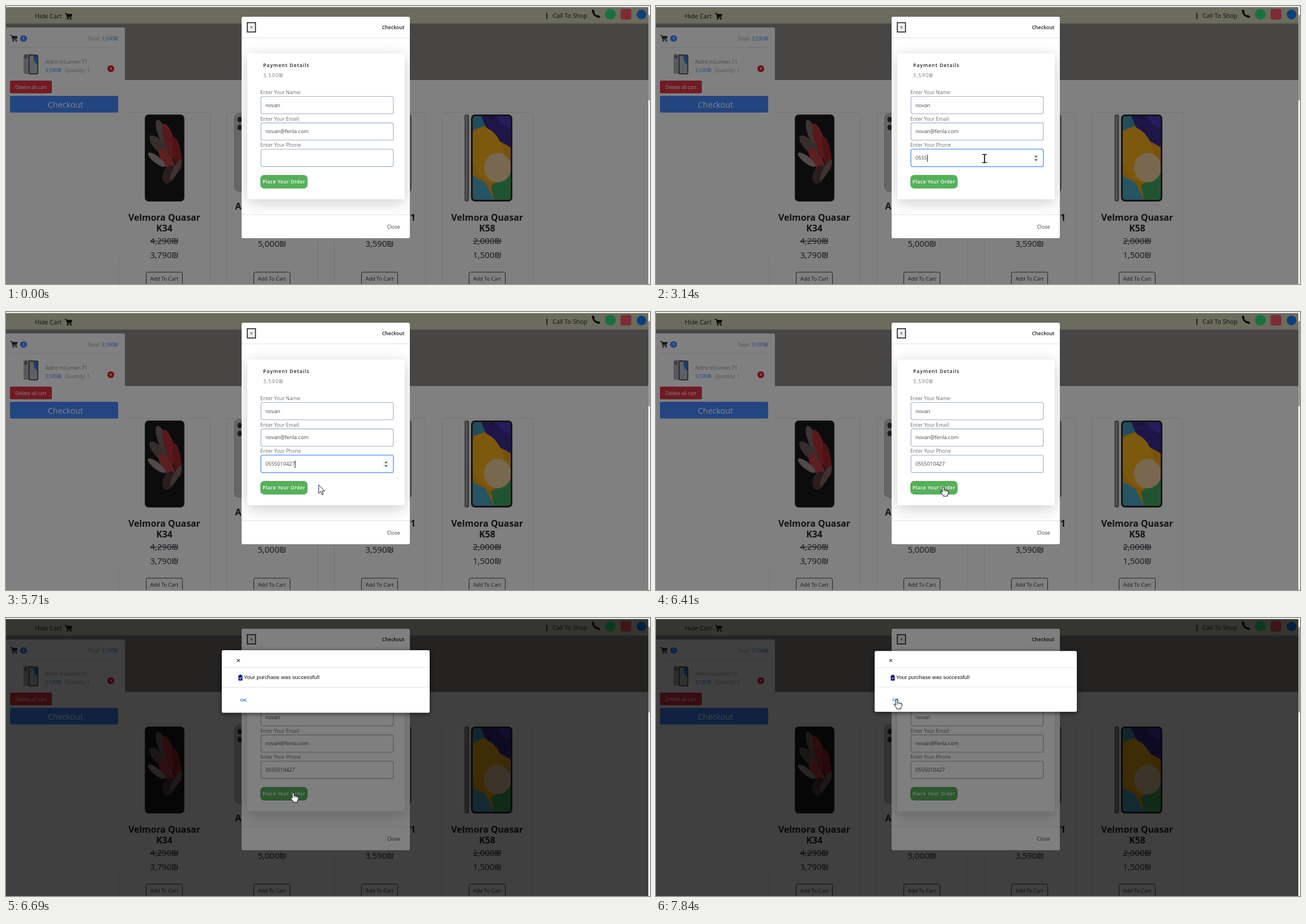
Recreate the animation shown at these times as an HTML page with a canvas. Size 1137 px wide and 492 px high, loop 8000 ms.

```html
<!DOCTYPE html>
<html lang="en">
<head>
<meta charset="utf-8">
<title>Shop checkout</title>
<style>
html, body { margin: 0; width: 100%; height: 100%; overflow: hidden; background: #808080; }
canvas { display: block; width: 1137px; height: 492px; }
</style>
</head>
<body>
<canvas id="stage" width="1137" height="492"></canvas>
<script>
const c = document.getElementById('stage').getContext('2d');
const LOOP = 8000;
const UI = '"Open Sans", "Noto Sans", "DejaVu Sans", sans-serif';
const ARIAL = '"Liberation Sans", Arial, sans-serif';

const NAME = 'novan', EMAIL = 'novan@fenla.com', PHONE = '0555010427';
const KEY_TIMES = [2570, 2710, 2860, 3140, 3290, 3430, 3710, 4140, 4290, 4420];
const CARET_FLIPS = [1430, 1860, 2430, 4860, 5430, 5860];
const FOCUS = 1430, BLUR = 6290;

// time, x, y, pointer kind
const MOVES = [
  [570, 1085, 472, 'arrow'], [710, 985, 425, 'arrow'], [860, 850, 365, 'arrow'], [1000, 725, 315, 'arrow'],
  [1140, 640, 280, 'beam'], [1290, 594, 272, 'beam'], [1430, 580, 270, 'beam'],
  [5140, 588, 272, 'beam'], [5290, 600, 279, 'beam'], [5430, 594, 290, 'arrow'], [5570, 578, 300, 'arrow'],
  [5710, 552, 306, 'arrow'], [5860, 527, 309, 'hand'], [6000, 514, 309, 'hand'], [6120, 507, 309, 'hand'],
  [6970, 504, 296, 'arrow'], [7110, 498, 274, 'arrow'], [7250, 490, 246, 'arrow'],
  [7390, 468, 212, 'arrow'], [7540, 446, 179, 'arrow'], [7680, 431, 155, 'arrow'], [7840, 425, 144, 'hand']
];
// time, scale, opacity, dimmer
const POPUP = [[6560, 0.987, 0.24, 0.25], [6690, 1.028, 1, 0.5], [6830, 0.98, 1, 0.5], [6970, 1, 1, 0.5]];

const passed = (times, t) => times.filter(v => t >= v).length;
const held = (rows, t) => rows.filter(r => t >= r[0]).pop();

function rect(x, y, w, h, fill, r = 0, line, lw = 1) {
  c.beginPath();
  c.roundRect(x, y, w, h, r);
  if (fill) { c.fillStyle = fill; c.fill(); }
  if (line) { c.strokeStyle = line; c.lineWidth = lw; c.stroke(); }
}
function oval(x, y, rx, ry, fill, turn = 0) {
  c.beginPath();
  c.ellipse(x, y, rx, ry, turn, 0, 7);
  c.fillStyle = fill;
  c.fill();
}
function shape(points, fill, line, lw = 1, close = true) {
  c.beginPath();
  for (let i = 0; i < points.length; i += 2) c.lineTo(points[i], points[i + 1]);
  if (close) c.closePath();
  if (fill) { c.fillStyle = fill; c.fill(); }
  if (line) { c.strokeStyle = line; c.lineWidth = lw; c.stroke(); }
}
// y is the middle of the capitals
function text(str, x, y, size, fill, { weight = 400, align = 'left', gap = 0, font = UI } = {}) {
  c.font = `${weight} ${size}px ${font}`;
  c.textAlign = align;
  c.letterSpacing = gap + 'px';
  c.fillStyle = fill;
  c.fillText(str, x, y + size * 0.36);
  return c.measureText(str).width;
}
function at(x, y, draw, scale = 1) {
  c.save();
  c.translate(x, y);
  c.scale(scale, scale);
  draw();
  c.restore();
}

function cartIcon(x, y, color) {
  at(x, y, () => {
    shape([0, 1, 2.5, 1, 4.5, 8.5, 11.5, 8.5], null, color, 1.4, false);
    shape([2.8, 2, 13, 2, 11.6, 7, 4.2, 7], color);
    oval(5, 10.8, 1.4, 1.4, color);
    oval(10.5, 10.8, 1.4, 1.4, color);
  });
}
function handset(x, y) {
  at(x, y, () => {
    c.beginPath();
    c.moveTo(-4.8, -4.5);
    c.quadraticCurveTo(-3.5, 3, 4.5, 5);
    c.strokeStyle = '#060606';
    c.lineWidth = 3;
    c.stroke();
    oval(-4.3, -4.6, 2, 3.2, '#060606', -0.4);
    oval(4.7, 4.6, 3.2, 2, '#060606', 0.4);
  });
}

function header() {
  rect(0, 0, 1137, 492, '#808080');
  rect(0, 31, 1134, 100, '#484645');
  rect(0, 2, 1134, 29, '#6b6c5e');
  rect(0, 30, 1134, 1.5, '#5f6054');
  text('Hide Cart', 51, 18.5, 10.8, '#111');
  cartIcon(104, 12, '#080808');
  rect(954, 12, 1.7, 11, '#111');
  text('Call To Shop', 965, 17, 10.8, '#111');
  handset(1041, 14);
  oval(1067, 14.5, 9.5, 9.5, '#1a7040');
  rect(1085, 5, 19, 19, '#7c2c34', 4);
  oval(1122, 15, 8.5, 8.5, '#0c3f7c');
}

function darkPhone() {
  rect(245, 192, 70, 154, '#151415', 7);
  c.save();
  rect(247, 194, 66, 150, '#0c0c0d', 5);
  c.clip();
  oval(276, 226, 8, 26, '#3d3535', -0.35);
  oval(289, 240, 9, 33, '#59191b', -0.3);
  oval(302, 262, 7, 30, '#4c1416', -0.15);
  oval(270, 247, 9, 23, '#352e2d', -0.75);
  oval(284, 272, 9, 25, '#5c2021', -0.55);
  oval(266, 272, 6, 19, '#514a48', -0.9);
  oval(288, 298, 11, 17, '#2a1d1d', 0.4);
  oval(300, 290, 5, 20, '#3a3432', 0.5);
  c.restore();
  oval(280, 198, 1.4, 1.4, '#050505');
}
function colourPhone() {
  rect(809.5, 192, 8, 154, '#3d3d3e', 3);
  rect(812, 194, 2, 150, '#5e5e5f', 1);
  rect(821, 192, 73, 154, '#141415', 7);
  c.save();
  rect(824, 195, 67, 148, '#78520a', 5);
  c.clip();
  shape([838, 195, 891, 195, 891, 250, 866, 236, 846, 212], '#1e1548');
  shape([866, 195, 891, 195, 891, 216, 874, 208], '#281b5c');
  shape([824, 195, 839, 195, 846, 212, 824, 220], '#204e5e');
  oval(850, 263, 29, 49, '#7d590e', -0.25);
  shape([824, 301, 846, 312, 862, 343, 824, 343], '#265462');
  shape([856, 318, 891, 296, 891, 343, 862, 343], '#205430');
  oval(868, 286, 24, 26, '#786850');
  c.restore();
  oval(858, 198, 1.5, 1.5, '#08080a');
}

function productCard(x, lines, price, old) {
  const mid = x + 80.5, mdl = { align: 'center' };
  rect(x + 0.5, 188.5, 161, 320, null, 3, '#747474');
  lines.forEach((s, i) => text(s, mid, 374.5 + i * 19, 15.8, '#111213', { weight: 700, align: 'center' }));
  if (old) {
    const w = text(old, mid, 416, 15, '#15161c', mdl);
    rect(mid - w / 2, 415.5, w, 1.1, '#15161c');
  }
  text(price, mid, old ? 441 : 421, 15, '#15161c', mdl);
  rect(x + 48.5, 471, 64, 30, null, 2.5, '#1f2022');
  text('Add To Cart', mid, 482.5, 9.2, '#1a1b1d', mdl);
}
function products() {
  productCard(199, ['Velmora Quasar', 'K34'], '3,790₪', '4,290₪');
  productCard(389, [], '5,000₪');
  productCard(579, [], '3,590₪');
  productCard(769, ['Velmora Quasar', 'K58'], '1,500₪', '2,000₪');
  darkPhone();
  colourPhone();
  rect(403.5, 190, 60, 138, '#666667', 8, '#555');
  oval(412.5, 201, 4, 5, '#1d1d1f');
  oval(412.5, 215, 4, 5, '#1d1d1f');
  rect(660, 190, 55.5, 140, '#4f4f50', 7, '#3a3a3b');
  const bold = { weight: 700 };
  text('Aldro mLumen', 404.5, 354.5, 15.8, '#111213', bold);
  text('mLumen 71', 723, 374.5, 15.8, '#111213', { ...bold, align: 'right' });
}

function cart() {
  const blue = '#234580', pale = '#858688', mid = { align: 'center' };
  rect(0, 38, 210, 412, '#808080', [0, 3, 0, 0]);
  cartIcon(7.5, 51, '#1a1b1d');
  oval(31, 57.5, 6.3, 5.7, blue);
  text('1', 31, 57.5, 7, pale, { weight: 700, ...mid });
  const w = text('3,590₪', 198, 57.5, 8.8, blue, { align: 'right' });
  text('Total:', 196 - w, 57.5, 8.8, '#4d4f52', { align: 'right' });
  rect(8, 72.5, 190, 1, '#727272');
  rect(31, 85, 18, 35, '#58595b', 3);
  oval(35, 90, 2.5, 3.5, '#38393c');
  rect(40, 86, 17, 35, '#1e1f22', 3);
  rect(41.5, 87.5, 14, 32, '#5d6064', 2);
  shape([48, 88, 55, 88, 55, 104, 50, 98], '#213c64');
  text('Aldro mLumen 71', 69, 99, 9, '#45474a');
  text('3,590₪', 69, 113.5, 8.6, blue);
  text('Quantity: 1', 104, 113.5, 8.6, '#505255');
  oval(185, 111, 6, 6, '#6c1118');
  text('×', 185, 110.5, 9, pale, { weight: 700, ...mid });
  rect(7, 132, 74, 22.5, '#701b23', 2.5);
  text('Delete all cart', 44, 143.5, 8.6, pale, mid);
  rect(7, 159, 191, 29.5, blue, 2);
  text('Checkout', 105, 175, 14.3, pale, mid);
}

function field(y, label, value, focused) {
  text(label, 449, y - 7.3, 8.8, '#6d6d6d');
  if (focused) rect(448.7, y - 1.3, 236.6, 33.6, '#c9ddfb', 4.5);
  rect(450.2, y + 0.2, 233.6, 30.6, '#fff', 3.2, focused ? '#80adf0' : '#bac5d6', 1.6);
  return 458 + text(value, 458, y + 15.5, 9.1, '#43464a');
}

function modal(t) {
  const focused = t >= FOCUS && t < BLUR;
  rect(416, 19, 297, 392, '#fff', 3);
  rect(426, 29.5, 14.5, 16.5, '#efefef', 0, '#151515', 1.5);
  text('×', 433.2, 37.5, 9, '#222', { align: 'center' });
  text('Checkout', 703.5, 38, 8.8, '#202124', { weight: 600, align: 'right' });
  rect(416, 56, 297, 1, '#dfe2e5');
  c.save();
  c.beginPath();
  c.rect(416, 57, 297, 312);
  c.clip();
  c.shadowColor = 'rgba(0,0,0,.2)';
  c.shadowBlur = 28;
  c.shadowOffsetY = 6;
  rect(426, 84, 278, 258, '#fff', 2);
  c.restore();
  rect(416, 369, 297, 1, '#dfe2e5');
  text('Close', 695.5, 391, 9, '#3a3d40', { align: 'right' });

  text('Payment Details', 454, 105, 8.7, '#222', { weight: 600, gap: 0.9 });
  text('3,590₪', 454, 123, 9, '#777', { gap: 1 });
  field(160, 'Enter Your Name:', NAME);
  field(206.7, 'Enter Your Email:', EMAIL);
  const end = field(253.3, 'Enter Your Phone', PHONE.slice(0, passed(KEY_TIMES, t)), focused);
  if (focused) {
    if (passed(CARET_FLIPS, t) % 2) rect(end, 263, 1, 13, '#222');
    rect(666, 262, 10, 14, '#f0f0f0');
    shape([668.5, 267.3, 673.5, 267.3, 671, 264.3], '#444');
    shape([668.5, 271.2, 673.5, 271.2, 671, 274.2], '#444');
  }
  rect(449, 299, 83.5, 24, '#56b05b', 7);
  text('Place Your Order', 490.7, 311.3, 8.1, '#fff', { weight: 600, align: 'center', gap: 0.6 });
}

// shadow only around the box, so a translucent panel stays clear
function outerShadow(x, y, w, h, r) {
  c.save();
  c.beginPath();
  c.rect(x - 30, y - 30, w + 60, h + 60);
  c.roundRect(x, y, w, h, r);
  c.clip('evenodd');
  c.shadowColor = 'rgba(0,0,0,.6)';
  c.shadowBlur = 9;
  c.shadowOffsetY = 2;
  rect(x, y, w, h, '#fff', r);
  c.restore();
}

function popup(t) {
  const row = held(POPUP, t);
  if (!row) return;
  const [, scale, alpha, dim] = row;
  rect(0, 2, 1134, 490, `rgba(0,0,0,${dim})`);
  c.globalAlpha = alpha;
  at(564.5, 112.3, () => {
    const box = [-178.5, -53.8, 357, 107.6];
    outerShadow(...box, 3);
    rect(...box, '#fff', 3);
    rect(-178.5, -24.8, 357, 0.9, '#e2e2e2');
    rect(-178.5, 9.4, 357, 0.9, '#e2e2e2');
    text('×', -150, -36.8, 11, '#444', { align: 'center', font: ARIAL, weight: 700 });
    rect(-150, -10.6, 7, 9, '#0b128f', 1);
    rect(-148.2, -11.8, 3.4, 2, '#0b128f', 0.6);
    shape([-148.6, -6, -147, -4.2, -144.4, -7.8], null, '#fff', 1, false);
    text('Your purchase was successful!', -140.5, -7.6, 9.5, '#111', { font: ARIAL });
    text('OK', -147, 32.3, 7.8, '#3f7fd0', { font: ARIAL, weight: 700 });
  }, scale);
  c.globalAlpha = 1;
}

const POINTERS = {
  arrow() {
    shape([0, 0, 0, 15, 3.5, 11.8, 6, 17.5, 8.3, 16.5, 5.9, 11, 10.7, 11], '#fff', '#000', 0.9);
  },
  beam() {
    shape([-4, -7.3, 4, -7.3], null, '#111', 1.4, false);
    shape([-4, 7.3, 4, 7.3], null, '#111', 1.4, false);
    shape([0, -7, 0, 7], null, '#111', 1.7, false);
  },
  hand() {
    c.lineJoin = 'round';
    shape([-1.5, 1, 0, 0, 1.5, 1, 1.5, 6, 3.5, 5.6, 4.5, 6.5, 6.5, 6.3, 7.3, 7.4, 9, 7.6, 9.4, 9,
      9.2, 12, 7.6, 14.5, 7.4, 17, 0.2, 17, -0.3, 15, -3.8, 11, -4.8, 8.7, -3.6, 8, -1.5, 10], '#fff', '#000', 0.95);
    for (const x of [1.5, 4.4, 7]) shape([x, 6.8, x, 9], null, '#000', 0.7, false);
  }
};

function draw(t) {
  header();
  products();
  cart();
  modal(t);
  popup(t);
  rect(0, 0, 1137, 2, '#ececec');
  rect(1134, 2, 3, 490, '#f1f1f1');
  rect(1134, 16, 3, 151, '#9a9a9a');
  const move = held(MOVES, t);
  if (move) at(move[1], move[2], POINTERS[move[3]]);
}

const start = performance.now();
function tick() {
  draw((performance.now() - start) % LOOP);
  requestAnimationFrame(tick);
}
tick();
</script>
</body>
</html>
```
